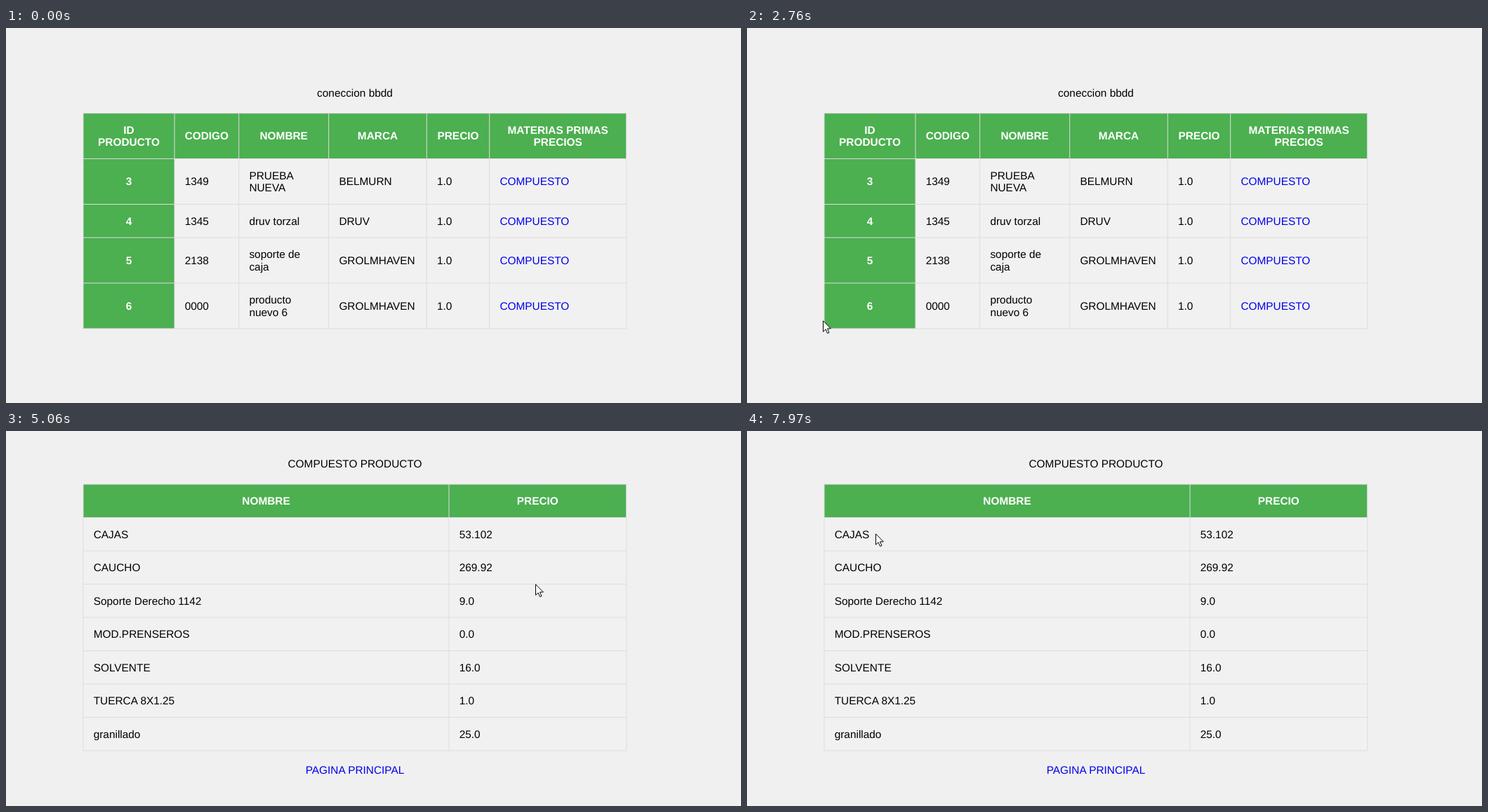
Animation of 1047x535 px, one loop 8 s. Source, as an HTML page:

```html
<!DOCTYPE html>
<html lang="es">
<head>
<meta charset="utf-8">
<title>Productos</title>
<style>
  html, body { margin: 0; width: 100%; height: 100%; overflow: hidden; background: #f0f0f0; }
  svg { display: block; cursor: default; }
  text { font: 15.4px "Liberation Sans", Arial, sans-serif; fill: #000; text-rendering: geometricPrecision; }
  .head { font-weight: bold; fill: #fff; }
  .mid { text-anchor: middle; }
  .link { fill: #00e; }
  .cell { fill: #f1f1f1; }
  .green { fill: #4caf50; }
  .grid { fill: none; stroke: #ddd; }
  #cursor path { fill: #fff; stroke: #000; }
  #cursor #beam { fill: none; stroke: #222; }
</style>
</head>
<body>
<svg width="1047" height="535" viewBox="0 0 1047 535">
  <g id="list"></g>
  <g id="detail"></g>
  <g id="cursor">
    <path id="arrow" d="M.5.8V16.2L4.1 12.8 6.6 18.5 9 17.5 6.5 11.9H11.4Z"/>
    <path id="beam" d="M-3.5-7.5h2.5l1 1 1-1h2.5M0-6.5v13M-3.5 7.5h2.5l1-1 1 1h2.5"/>
    <path id="hand" d="M-1.5 12V1.5a1.5 1.5 0 0 1 3 0V7a1.5 1.5 0 0 1 3 .5 1.5 1.5 0 0 1 3 .7 1.4 1.4 0 0 1 2.8 .8V14l-1.8 4v3H0V18.5l-5-6.5c-1-2 1-3 2.2-1.6Z"/>
  </g>
</svg>
<script>
const LOOP = 8000, STEP = 70, CLICK = 4720, SWITCH = 5060;
const LEFT = 110, MIDDLE = 497, ROW = 47.5, LINE = 17.45, PAD = 14.7;
const $ = id => document.getElementById(id);

function add(parent, tag, attrs, content = '') {
  const el = document.createElementNS('http://www.w3.org/2000/svg', tag);
  for (const name in attrs) el.setAttribute(name, attrs[name]);
  el.textContent = content;
  parent.appendChild(el);
}

// Lines of text separated by "|", centred vertically on y.
function label(page, x, y, content, kind) {
  const lines = content.split('|');
  lines.forEach((line, i) =>
    add(page, 'text', { x, y: y + 5.4 + (i - (lines.length - 1) / 2) * LINE, class: kind }, line));
}

// Running edges of a list of sizes.
const edges = (first, sizes) =>
  sizes.reduce((all, size) => [...all, all[all.length - 1] + size], [first]);

// Row height follows the number of text lines; greenCols body columns are green too.
function table(page, title, top, widths, rows, greenCols) {
  const xs = edges(LEFT, widths);
  const ys = edges(top, rows.map(row => ROW + (row.some(c => c.includes('|')) ? LINE : 0)));
  const right = xs[xs.length - 1], bottom = ys[ys.length - 1];
  const fill = (x2, y2, kind) =>
    add(page, 'rect', { x: LEFT, y: top, width: x2 - LEFT, height: y2 - top, class: kind });
  fill(right, bottom, 'cell');
  fill(right, ys[1], 'green');
  fill(xs[greenCols], bottom, 'green');
  add(page, 'path', {
    class: 'grid',
    d: xs.map(x => `M${x} ${top - .5}V${bottom + .5}`).join('') +
       ys.map(y => `M${LEFT} ${y}H${right}`).join('')
  });
  label(page, MIDDLE, top - 29, title, 'mid');
  rows.forEach((row, r) => row.forEach((content, c) => {
    const y = (ys[r] + ys[r + 1]) / 2;
    if (!r || c < greenCols) label(page, (xs[c] + xs[c + 1]) / 2, y, content, 'head mid');
    else label(page, xs[c] + PAD, y, content, content === 'COMPUESTO' ? 'link' : '');
  }));
}

const product = (id, code, name, brand) => [id, code, name, brand, '1.0', 'COMPUESTO'];

table($('list'), 'coneccion bbdd', 121.6, [130, 91.7, 128, 139.6, 89.4, 195], [
  ['ID|PRODUCTO', 'CODIGO', 'NOMBRE', 'MARCA', 'PRECIO', 'MATERIAS PRIMAS|PRECIOS'],
  product('3', '1349', 'PRUEBA|NUEVA', 'BELMURN'),
  product('4', '1345', 'druv torzal', 'DRUV'),
  product('5', '2138', 'soporte de|caja', 'GROLMHAVEN'),
  product('6', '0000', 'producto|nuevo 6', 'GROLMHAVEN')
], 1);

table($('detail'), 'COMPUESTO PRODUCTO', 76, [521, 252.7], [
  ['NOMBRE', 'PRECIO'],
  ['CAJAS', '53.102'],
  ['CAUCHO', '269.92'],
  ['Soporte Derecho 1142', '9.0'],
  ['MOD.PRENSEROS', '0.0'],
  ['SOLVENTE', '16.0'],
  ['TUERCA 8X1.25', '1.0'],
  ['granillado', '25.0']
], 0);
label($('detail'), MIDDLE, 484, 'PAGINA PRINCIPAL', 'mid link');

// Each move is a quadratic curve that starts where the previous one stopped.
const moves = [];
let last = [985, 535];
function move(start, end, bend, to, power = 1) {
  moves.push({ start, end, from: last, bend, to, power });
  last = to;
}
move(270, 740, [1000, 510], [1013, 524]);
move(940, 1710, [861, 248], [497, 190], 2);
move(1780, 2550, [150, 153], [84, 253]);
move(2620, 2760, [72, 340], [108, 417]);
move(2830, 3400, [200, 529], [856, 487]);
move(3470, 4250, [929, 401], [764, 236], 2);
move(4320, 4390, [758, 226], [754, 218]);
move(5720, 5790, [790, 205], [813, 180]);
move(5860, 6470, [611, 18], [373, 99]);
move(6680, 7010, [560, 99], [745, 95]);
move(7340, 7970, [0, 150], [183, 146]);

// The pointer advances in fixed steps, as in a screen recording.
function pointer(t) {
  const m = moves.filter(m => m.start <= t).pop();
  if (!m) return null;
  const steps = Math.round((m.end - m.start) / STEP) + 1;
  const step = Math.floor((t - m.start) / STEP + .1) + 1;
  const u = Math.min(1, step / steps) ** m.power, v = 1 - u;
  return [0, 1].map(i =>
    Math.round(v * v * m.from[i] + 2 * u * v * m.bend[i] + u * u * m.to[i]));
}

const targets = page => [...$(page).querySelectorAll('text')].map(el =>
  ({ box: el.getBBox(), shape: el.matches('.link') ? 'hand' : 'beam' }));
const spots = { list: targets('list'), detail: targets('detail') };

function shapeAt([x, y], page) {
  const near = 7;
  const hit = spots[page].find(({ box }) =>
    x > box.x - near && x < box.x + box.width + near && y > box.y && y < box.y + box.height);
  return hit ? hit.shape : 'arrow';
}

const show = (id, on) => $(id).style.display = on ? '' : 'none';

function draw(t) {
  const page = t < SWITCH ? 'list' : 'detail';
  const p = pointer(t);
  for (const id in spots) show(id, id === page);
  show('cursor', p);
  if (!p) return;
  const loading = t >= CLICK && t < SWITCH;
  const shape = loading ? 'arrow' : shapeAt(p, page);
  const shift = shape === 'beam' ? .5 : 0;
  $('cursor').setAttribute('transform', `translate(${p[0] + shift} ${p[1]})`);
  ['arrow', 'beam', 'hand'].forEach(id => show(id, id === shape));
}

const begin = performance.now();
function tick() {
  draw((performance.now() - begin) % LOOP);
  requestAnimationFrame(tick);
}
tick();
</script>
</body>
</html>
```
